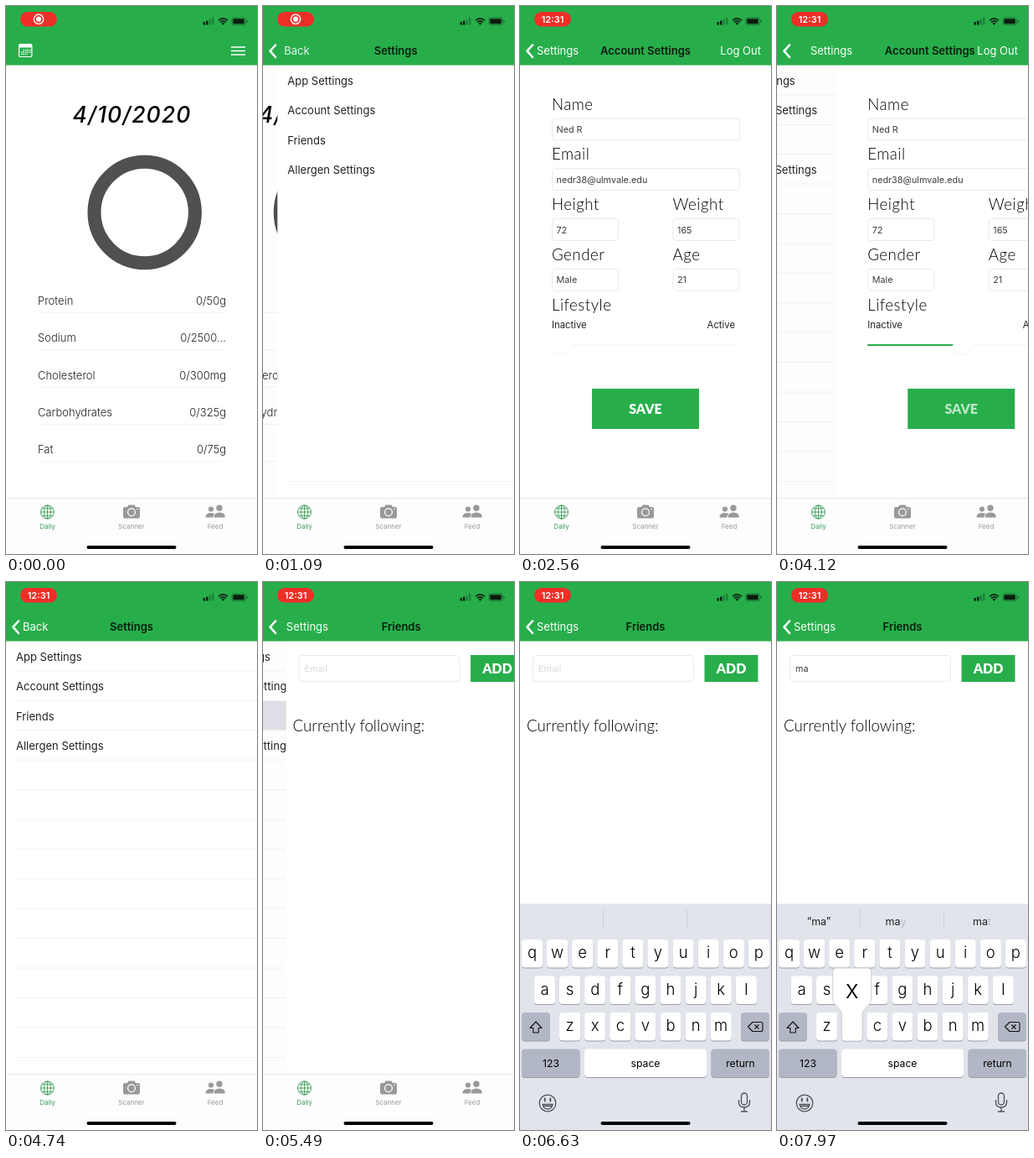
An HTML page for the animation above (8 s loop, 300 by 653 pixels).

```html
<!DOCTYPE html>
<html lang="en">
<head>
<meta charset="utf-8">
<title>Nutrition app walkthrough</title>
<style>
@property --now { syntax: "<number>"; inherits: true; initial-value: 0; }
@property --settings { syntax: "<number>"; inherits: true; initial-value: 0; }
@property --account { syntax: "<number>"; inherits: true; initial-value: 0; }
@property --friends { syntax: "<number>"; inherits: true; initial-value: 0; }
@property --slider { syntax: "<number>"; inherits: true; initial-value: 0; }
@property --keys { syntax: "<number>"; inherits: true; initial-value: 0; }

html, body { margin: 0; width: 100%; height: 100%; overflow: hidden; background: #fff; }
svg {
  display: block; width: 100%; height: 100%;
  --green: #27ae4b;
  --over: max(var(--account), var(--friends));
  animation: 8s cubic-bezier(.25, .7, .2, 1) infinite;
  animation-name: now, settings, account, friends, slider, keys;
}
@keyframes now {
  from { --now: 0; animation-timing-function: linear }
  to { --now: 8000 }
}
@keyframes settings {
  0%, 10.25% { --settings: 0 }
  16.5%, 100% { --settings: 1 }
}
@keyframes account {
  0%, 23% { --account: 0 }
  29.25%, 51.02% { --account: 1 }
  57.27%, 100% { --account: 0 }
}
@keyframes friends {
  0%, 65.75% { --friends: 0 }
  72%, 100% { --friends: 1 }
}
@keyframes slider {
  0%, 34% { --slider: 0; animation-timing-function: ease-in-out }
  44.5%, 100% { --slider: 1 }
}
@keyframes keys {
  0%, 75.6% { --keys: 0 }
  80.6%, 100% { --keys: 1 }
}
@keyframes press {
  0%, 46% { opacity: 1 }
  47%, 48.5% { opacity: .3 }
  51.5% { opacity: .7 }
  55%, 100% { opacity: 1 }
}

/* visible only between --from and --to, in ms */
.during { opacity: calc((var(--now) - var(--from)) * (var(--to) - var(--now))); }

text { font: 400 13px Inter, sans-serif; fill: #222; white-space: pre; }
.light { font-weight: 300; }
.date { font-size: 26.5px; font-weight: 500; font-style: italic; letter-spacing: 1.1px; fill: #000; }
.label { font: 300 18.7px Lato, sans-serif; letter-spacing: .5px; fill: #000; }
.heading { letter-spacing: 0; }
.small { font-size: 10.8px; fill: #3c3c3c; }
.scale { font-size: 11.3px; }
.button { font: 900 16px Lato, sans-serif; fill: #fff; }
.title { font-weight: 600; fill: #0a1a0d; }
.white { fill: #fff; }
.mid { text-anchor: middle; }
.end { text-anchor: end; }
.tab { font-size: 8px; text-anchor: middle; fill: #999; }
.active { fill: #3a9e58; }
.field { fill: #fff; stroke: #e9e9e9; stroke-width: 1; }
.rule { stroke: #f3f3f3; stroke-width: 1; }
.green { fill: var(--green); }
.veil { fill: #20103c; }
.chevron { fill: none; stroke: #fff; stroke-width: 2.6; stroke-linecap: round; stroke-linejoin: round; }
.letter { font-size: 18.5px; font-weight: 300; text-anchor: middle; fill: #000; }
.zoomed { font-size: 30px; font-weight: 300; text-anchor: middle; fill: #000; }
.word { font-size: 12.2px; text-anchor: middle; fill: #000; }
.hint { font-size: 12.5px; text-anchor: middle; }
.faint { fill: #b9bac2; }

.daily-page { transform: translateX(calc(var(--settings) * -90px)); }
.settings-page { transform: translateX(calc((1 - var(--settings)) * 300px - var(--over) * 90px)); }
.account-page { transform: translateX(calc((1 - var(--account)) * 300px)); }
.friends-page { transform: translateX(calc((1 - var(--friends)) * 300px)); }
.settings-page .veil { opacity: calc(var(--settings) * .01); }
.account-page .veil { opacity: calc(var(--account) * .01); }
.friends-page .veil { opacity: calc(var(--friends) * .01); }

.daily-nav { opacity: calc(1 - var(--settings) * 2); }
.back-arrow { opacity: var(--settings); }
.back-label {
  opacity: calc(var(--settings) * 2 - 1 - var(--over) * 4);
  transform: translateX(calc((1 - var(--settings)) * 90px - var(--over) * 60px));
}
.settings-title {
  opacity: calc(var(--settings) * 2 - .5 - var(--over) * 2.5);
  transform: translateX(calc((1 - var(--settings)) * 150px - var(--over) * 104px));
}
.settings-label {
  opacity: calc(var(--over) * 3 - 1);
  transform: translateX(calc((1 - var(--over)) * 85px));
}
.account-title { opacity: calc(var(--account) * 2 - .5); transform: translateX(calc((1 - var(--account)) * 140px)); }
.friends-title { opacity: calc(var(--friends) * 2 - .5); transform: translateX(calc((1 - var(--friends)) * 165px)); }
.log-out { opacity: calc(var(--account) * 2 - .5); }

.fill { transform-origin: 38px 404px; transform: scaleX(calc(var(--slider) * .94 + .03)); opacity: calc(var(--slider) * 20); }
.knob { transform: translateX(calc(var(--slider) * 102px)); }
.save { animation: press 8s linear infinite; }
.keyboard { transform: translateY(calc((1 - var(--keys)) * 272px)); }
</style>
</head>
<body>
<svg viewBox="0 0 300 653">
  <rect width="300" height="653" fill="#fff"/>

  <g class="daily-page">
    <text class="date mid" x="150.500" y="138.500">4/10/2020</text>
    <circle cx="165.700" cy="246" r="60.200" fill="none" stroke="#514f51" stroke-width="16"/>
    <g id="nutrients"></g>
  </g>

  <g class="settings-page">
    <rect class="veil" x="-300" y="70" width="300" height="517"/>
    <rect y="70" width="300" height="517" fill="#fff"/>
    <rect class="during" style="--from:1700;--to:3600" y="106" width="300" height="35.400" fill="#e1dfe7"/>
    <rect class="during" style="--from:5130;--to:8001" y="141.400" width="300" height="35.400" fill="#e1dfe7"/>
    <g id="options"></g>
  </g>

  <g class="account-page">
    <rect class="veil" x="-300" y="70" width="300" height="517"/>
    <rect y="70" width="300" height="517" fill="#fff"/>
    <g id="form"></g>
    <text class="label" x="38" y="362.500">Lifestyle</text>
    <text class="scale" x="38" y="384">Inactive</text>
    <text class="scale end" x="257" y="384">Active</text>
    <path class="rule" d="M38 404H262"/>
    <rect class="fill green" x="38" y="403" width="116" height="2"/>
    <g class="knob">
      <circle cx="49" cy="405" r="11" fill="#000" opacity=".05"/>
      <circle cx="49" cy="404" r="11" fill="#fff"/>
    </g>
    <rect class="green" x="86" y="456" width="128" height="48"/>
    <text class="button mid save" x="150" y="485.500">SAVE</text>
  </g>

  <g class="friends-page">
    <rect class="veil" x="-300" y="70" width="300" height="517"/>
    <rect y="70" width="300" height="517" fill="#fff"/>
    <rect class="field" x="15.500" y="87.500" width="192" height="31" rx="4"/>
    <text class="small during" style="--from:-1;--to:6930;fill:#d9d9dc" x="22" y="106.500">Email</text>
    <text class="small during" style="--from:6930;--to:7670" x="22" y="106.500">m</text>
    <text class="small during" style="--from:7670;--to:8001" x="22" y="106.500">ma</text>
    <rect class="green" x="220.500" y="87" width="64" height="32"/>
    <text class="button mid" x="252.500" y="108.500">ADD</text>
    <text class="label heading" x="8" y="178">Currently following:</text>
  </g>

  <!-- navigation bar -->
  <rect class="green" width="300" height="70.600"/>
  <g class="daily-nav" fill="#fff">
    <path d="M17 45h12.500q2 0 2 2v12q0 2-2 2h-12.500q-2 0-2-2v-12q0-2 2-2zM16.200 49.500v9.300q0 1.200 1 1.200h12.100q1 0 1-1.200v-9.300z" fill-rule="evenodd"/>
    <path d="M20.500 52.500h9M18 55h11.500M18 57.500h8" stroke="#fff" stroke-width="1.500" stroke-dasharray="1.500 1"/>
    <path d="M269 49H286M269 53.500H286M269 58H286" stroke="#fff" stroke-width="1.400"/>
  </g>
  <path class="chevron back-arrow" d="M15 46.500L8.500 53.700L15 61"/>
  <text class="white back-label" x="20" y="58">Back</text>
  <text class="title mid settings-title" x="150" y="58">Settings</text>
  <text class="white settings-label" x="20" y="58">Settings</text>
  <text class="title mid account-title" x="150" y="58">Account Settings</text>
  <text class="title mid friends-title" x="150" y="58">Friends</text>
  <text class="white end log-out" x="288" y="58">Log Out</text>

  <!-- status bar -->
  <rect x="17" y="7" width="44" height="17.500" rx="8.700" fill="#ee2f27"/>
  <g class="during" style="--from:-1;--to:2300">
    <circle cx="39" cy="15.700" r="5.700" fill="none" stroke="#fff" stroke-width="1.400"/>
    <circle cx="39" cy="15.700" r="3.100" fill="#fff"/>
  </g>
  <text class="white mid during" style="--from:2300;--to:8001;font-size:11px;font-weight:600" x="39" y="19.700">12:31</text>
  <g fill="#0b1d10">
    <rect x="235.500" y="19" width="2.400" height="3.500" rx=".6"/>
    <rect x="239" y="17.500" width="2.400" height="5" rx=".6"/>
    <g opacity=".3">
      <rect x="242.500" y="15.500" width="2.400" height="7" rx=".6"/>
      <rect x="246" y="13.500" width="2.400" height="9" rx=".6"/>
    </g>
    <path d="M259.500 22.800l-2-2.200q2-1.500 4 0z"/>
    <path d="M254 17.200q5.500-4.600 11 0M256 19.300q3.500-2.800 7 0" fill="none" stroke="#0b1d10" stroke-width="1.600"/>
    <rect x="270" y="14" width="16.500" height="8.600" rx="2.400" fill="none" stroke="#0b1d10" stroke-opacity=".45" stroke-width=".9"/>
    <rect x="271.300" y="15.300" width="13.600" height="6" rx="1.300"/>
    <rect x="287.500" y="16.800" width="1.200" height="3" rx=".6" opacity=".5"/>
  </g>

  <!-- tab bar -->
  <rect y="586" width="300" height="67" fill="#fdfdfd"/>
  <path d="M0 586.500H300" stroke="#e6e6e6"/>
  <g fill="none" stroke="#3a9e58" stroke-width=".9">
    <circle cx="49.500" cy="603" r="8"/>
    <ellipse cx="49.500" cy="603" rx="4" ry="8"/>
    <path d="M49.500 595v16M41.500 603h16M43 598.700h13M43 607.300h13"/>
  </g>
  <g fill="#999">
    <path d="M142 597h3l1.500-2.500h7l1.500 2.500h3q2 0 2 2v9.500q0 2-2 2h-16q-2 0-2-2v-9.500q0-2 2-2z"/>
    <circle cx="150" cy="603.300" r="4.400" fill="none" stroke="#fff" stroke-width="1.300"/>
    <circle cx="157" cy="599.500" r=".8" fill="#fff"/>
    <circle cx="245" cy="599.500" r="3.100"/>
    <path d="M238.500 609.500q0-5.500 6.500-5.500 3 0 4.300 1.300-2 1.700-2 4.200z"/>
    <circle cx="255" cy="598.300" r="3.700"/>
    <path d="M248.500 609.500q0-6 6.700-6t6.700 6z"/>
  </g>
  <text class="tab active" x="49.500" y="623">Daily</text>
  <text class="tab" x="150" y="623">Scanner</text>
  <text class="tab" x="250" y="623">Feed</text>

  <g class="keyboard">
    <rect y="383.500" width="300" height="270" fill="#e2e4ec"/>
    <path d="M99.500 391V412.500M199.500 391V412.500" stroke="#c9ccd5"/>
    <g class="during" style="--from:7000;--to:7720">
      <text class="hint" x="50" y="409">“m”</text>
      <text class="hint" x="144" y="409">m<tspan class="faint">y</tspan></text>
      <text class="hint" x="245" y="409">m<tspan class="faint">e</tspan></text>
    </g>
    <g class="during" style="--from:7720;--to:8001">
      <text class="hint" x="50" y="409">“ma”</text>
      <text class="hint" x="142" y="409">ma<tspan class="faint">y</tspan></text>
      <text class="hint" x="245" y="409">ma<tspan class="faint">t</tspan></text>
    </g>
    <g id="keys"></g>
    <path d="M19 524l7 7.500h-3.800v5.500h-6.400v-5.500h-3.800z" fill="none" stroke="#111" stroke-width="1.100" stroke-linejoin="round"/>
    <path d="M278 524.500h10q2 0 2 2v7q0 2-2 2h-10l-5.500-5.500zM280.500 527.500l5 5M285.500 527.500l-5 5" fill="none" stroke="#111" stroke-width="1.100" stroke-linejoin="round"/>
    <g fill="none" stroke="#4c5059" stroke-width="1.300">
      <circle cx="33" cy="621" r="9.800"/>
      <path d="M27 622.500h12q-1 5.500-6 5.500t-6-5.500zM27.500 624.500h11"/>
      <path d="M29.700 615.500v3M36.300 615.500v3" stroke-width="1.900" stroke-linecap="round"/>
      <rect x="264.500" y="609" width="7" height="14" rx="3.500"/>
      <path d="M261.500 617v2.500q0 6.500 6.500 6.500t6.500-6.500v-2.500M268 626v5M264 631h8"/>
    </g>
    <g id="popups"></g>
  </g>
  <rect x="96.500" y="643" width="107" height="4" rx="2" fill="#000"/>
</svg>

<script>
const put = (id, parts) => { document.getElementById(id).innerHTML = parts.join(""); };
const rule = (x1, x2, y) => `<path class="rule" d="M${x1} ${y}H${x2}"/>`;

const nutrients = { Protein: "0/50g", Sodium: "0/2500...", Cholesterol: "0/300mg", Carbohydrates: "0/325g", Fat: "0/75g" };
put("nutrients", Object.entries(nutrients).map(([name, amount], i) => {
  const y = 356 + i * 44.3;
  return `<text class="light" x="38" y="${y}">${name}</text>
    <text class="light end" x="263" y="${y}">${amount}</text>` + rule(38, 263, y + 9.5);
}));

const ROW = 35.4;
const options = ["App Settings", "Account Settings", "Friends", "Allergen Settings"];
const dividers = Array.from({ length: 13 }, (_, i) => rule(12, 300, 106 + i * ROW));
put("options", [
  `<g class="during" style="--from:1840;--to:8001">${dividers.join("")}</g>`,
  rule(12, 300, 566.5),
  ...options.map((name, i) => `<text x="12" y="${94 + i * ROW}">${name}</text>`)
]);

const field = (label, value, x, y, width) => `<text class="label" x="${x}" y="${y}">${label}</text>
  <rect class="field" x="${x + .5}" y="${y + 10.5}" width="${width}" height="26" rx="3.5"/>
  <text class="small" x="${x + 5.5}" y="${y + 27.5}">${value}</text>`;
put("form", [
  field("Name", "Ned R", 38, 123.5, 224),
  field("Email", "nedr38@ulmvale.edu", 38, 183.3, 224),
  field("Height", "72", 38, 243, 79),
  field("Weight", "165", 182.5, 243, 79),
  field("Gender", "Male", 38, 302.8, 79),
  field("Age", "21", 182.5, 302.8, 79)
]);

const key = (x, y, width, fill = "#fff") =>
  `<rect x="${x}" y="${y + 1}" width="${width}" height="33.500" rx="4" fill="#999ca6"/>
   <rect x="${x}" y="${y}" width="${width}" height="33.500" rx="4" fill="${fill}"/>`;
const word = (text, x) => `<text class="word" x="${x}" y="577.500">${text}</text>`;
const GREY = "#b2b7c5";
const spots = {};
const letters = [["qwertyuiop", 14.5], ["asdfghjkl", 29.5], ["zxcvbnm", 59.6]].flatMap(([row, start], r) =>
  [...row].map((char, i) => {
    const x = start + i * 30.1, y = 426 + r * 43.5;
    spots[char] = [x, y];
    return key(x - 12.6, y, 25.2) + `<text class="letter" x="${x}" y="${y + 22}">${char}</text>`;
  }));
put("keys", [
  ...letters,
  key(2, 513, 34, GREY), key(264, 513, 34, GREY),
  key(2, 556.5, 69.5, GREY), key(77, 556.5, 146), key(228.5, 556.5, 69.5, GREY),
  word("123", 37), word("space", 150), word("return", 263.5)
]);

const BALLOON = "M-18-53h36q5 0 5 5v32q0 5-5 9q-5 4-5.500 9v28q0 4-4 4h-17q-4 0-4-4v-28q-.5-5-5.500-9q-5-4-5-9v-32q0-5 5-5z";
const popup = (char, from, to) => {
  const [x, y] = spots[char];
  return `<g class="during" style="--from:${from};--to:${to}"><g transform="translate(${x} ${y})">
    <path d="${BALLOON}" fill="#fff" stroke="#c3c6cf" stroke-width=".8"/>
    <text class="zoomed" y="-17">${char}</text></g></g>`;
};
put("popups", [popup("m", 6770, 6930), popup("a", 7500, 7670), popup("x", 7920, 8001)]);
</script>
</body>
</html>
```
